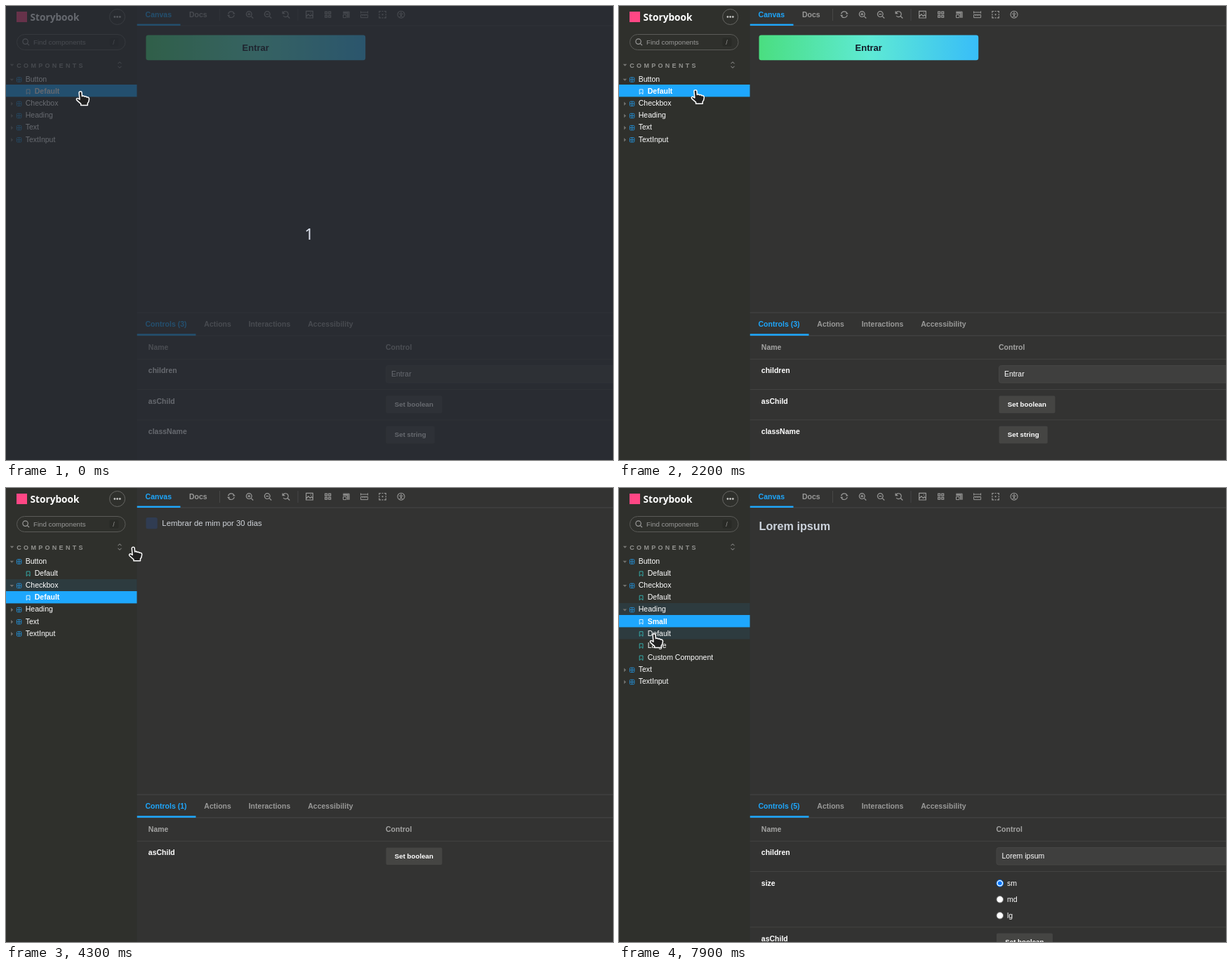
An HTML page with a canvas for the animation above (8000 ms loop, 865 by 647 pixels).

```html
<!DOCTYPE html>
<html lang="en">
<head>
<meta charset="utf-8">
<title>Component explorer</title>
<style>
html, body { margin: 0; width: 100%; height: 100%; overflow: hidden; background: #333332; }
canvas { display: block; width: 100%; height: 100%; }
</style>
</head>
<body>
<canvas id="stage" width="865" height="647"></canvas>
<script>
const W = 865, H = 647, LOOP = 8000, STEP = 100;
const ctx = document.getElementById('stage').getContext('2d');
const SANS = '"Liberation Sans", Arial, sans-serif';
const BLUE = '#1ea7fd', GREY = '#999998', LINE = '#474746', SIDE = '#2f302c', MAIN = '#333332';
const ROW_H = 17.15, FIRST_ROW = 104;

// Pointer tip: time, x, y
const PATH = [
  [0, 106, 121], [600, 106, 121], [1500, 317, 61], [1600, 317, 61],
  [2500, 36, 139], [2600, 27, 139], [2700, 27, 139], [2800, 7, 139], [2900, 7, 139],
  [3000, 8, 138], [3100, 8, 139], [3200, 8, 139], [3400, 20, 139], [3700, 34, 146],
  [3800, 34, 146], [4000, 60, 154], [4500, 247, 45], [4700, 208, 53], [5400, 208, 53],
  [5500, 207, 54], [6300, 64, 165], [6500, 42, 172], [7000, 42, 172],
  [7450, 175, 88], [7900, 50, 207], [8000, 50, 207]
];

const HAND = new Path2D('M4.6 2.7C4.5 .3 8.5 .2 8.6 2.6L8.9 7.6C10 6.9 11.6 7.2 12.2 8.1C13.4 7.6 14.8 8 15.4 8.9C17.4 8.4 19.2 9.6 19 11.8L18.2 15.6L16.8 17.6V20.4H7.2V18.4L1.5 13.4C-.2 11.4 2 9.6 4 11L5.5 12.1Z');

function pointerAt(t) {
  const i = PATH.findIndex((k, n) => n && t <= k[0]);
  const [t0, x0, y0] = PATH[i - 1], [t1, x1, y1] = PATH[i];
  const p = (t - t0) / (t1 - t0), e = p * p * (3 - 2 * p);
  return { x: x0 + (x1 - x0) * e, y: y0 + (y1 - y0) * e };
}

function rect(x, y, w, h, color) {
  ctx.fillStyle = color;
  ctx.fillRect(x, y, w, h);
}

function round(x, y, w, h, r, fill, stroke) {
  ctx.beginPath();
  ctx.roundRect(x, y, w, h, r);
  if (fill) { ctx.fillStyle = fill; ctx.fill(); }
  if (stroke) { ctx.strokeStyle = stroke; ctx.lineWidth = 1; ctx.stroke(); }
}

function circle(x, y, r, fill, stroke, width = 1) {
  ctx.beginPath();
  ctx.arc(x, y, r, 0, 7);
  if (fill) { ctx.fillStyle = fill; ctx.fill(); }
  if (stroke) { ctx.strokeStyle = stroke; ctx.lineWidth = width; ctx.stroke(); }
}

// Text centred vertically on y by its capital height
function text(s, x, y, color = '#fff', bold = false, size = 10.53, family = SANS) {
  ctx.font = `${bold ? 'bold ' : ''}${size}px ${family}`;
  ctx.fillStyle = color;
  ctx.fillText(s, x, y + size * 0.36);
}

// Strokes an SVG path around (x, y)
function icon(x, y, d, color = GREY, width = 1.2) {
  ctx.save();
  ctx.translate(x, y);
  ctx.strokeStyle = color;
  ctx.lineWidth = width;
  ctx.stroke(new Path2D(d));
  ctx.restore();
}

function triangle(x, y, open, color) {
  ctx.fillStyle = color;
  ctx.fill(new Path2D(open
    ? `M${x - 2.8} ${y - 1.2}h5.6l-2.8 3z`
    : `M${x - 1.2} ${y - 2.8}v5.6l3 -2.8z`));
}

function rowsAt(t) {
  const checkbox = t >= 3300, heading = t >= 6800;
  const active = heading ? 'Heading/Small' : checkbox ? 'Checkbox/Default' : 'Button/Default';
  const tree = [
    ['Button', ['Default']],
    ['Checkbox', checkbox ? ['Default'] : []],
    ['Heading', heading ? ['Small', 'Default', 'Large', 'Custom Component'] : []],
    ['Text', []],
    ['TextInput', []]
  ];
  const focus = heading ? 'Heading' : checkbox && t < 4700 ? 'Checkbox' : '';
  return tree.flatMap(([name, stories]) => [
    { name, open: stories.length > 0, focus: name === focus },
    ...stories.map(s => ({ name: s, story: true, active: name + '/' + s === active }))
  ]);
}

function drawRow(row, i, tip) {
  const y = FIRST_ROW + i * ROW_H, top = Math.round(y - 8.7);
  const hover = tip.x < 186 && Math.abs(tip.y - y) < ROW_H / 2;
  if (row.active) rect(0, top, 186.5, 17.4, BLUE);
  else if (hover || row.focus) rect(0, top, 186.5, 17.4, 'rgba(30,167,253,.09)');
  if (row.story) {
    icon(31.6, y + 1, 'M-2.4 -3.2H2.4V3.4L0 1.2L-2.4 3.4Z', row.active ? '#d9f1ff' : '#35aaa8', 1);
    text(row.name, 40.7, y, '#fff', row.active);
  } else {
    triangle(8.3, y + 1, row.open, hover ? '#a0a09e' : '#737370');
    icon(18.6, y + 1, 'M-3.2 -2.2Q-3.2 -3.2 -2.2 -3.2H2.2Q3.2 -3.2 3.2 -2.2V2.2Q3.2 3.2 2.2 3.2H-2.2Q-3.2 3.2 -3.2 2.2ZM0 -3.2V3.2M-3.2 0H3.2', '#2489ca', 1);
    text(row.name, 27.7, y);
  }
}

function drawSidebar(t, tip) {
  rect(0, 0, 186.5, H, SIDE);
  rect(15, 8, 15, 15, '#ff4785');
  text('Storybook', 34.5, 15.6, '#fff', true, 13.7, '"Open Sans", sans-serif');
  circle(158.6, 15.5, 11, null, '#666663');
  for (const dx of [-3.7, 0, 3.7]) circle(158.6 + dx, 15.5, 1.4, '#bdbdbb');

  round(15.5, 40.5, 154.5, 22, 11, null, '#5b5b58');
  circle(27.6, 50.6, 3.7, null, GREY, 1.2);
  icon(27.6, 50.6, 'M2.7 2.7L5.4 5.4');
  text('Find components', 39, 51.3, GREY, false, 9.72);
  round(147.5, 45.5, 13, 12, 2.5, '#292a26');
  text('/', 152.2, 51.3, GREY, false, 9);

  triangle(8.5, 84, true, '#777774');
  ctx.letterSpacing = '3.3px';
  text('COMPONENTS', 15.3, 85, '#92928f', true, 9);
  ctx.letterSpacing = '0px';
  icon(162, 84, 'M-2.5 -1.8L0 -4.3L2.5 -1.8M-2.5 1.8L0 4.3L2.5 1.8', GREY, 1);
  rowsAt(t).forEach((row, i) => drawRow(row, i, tip));
}

function drawToolbar() {
  text('Canvas', 198.6, 12, BLUE, true);
  text('Docs', 261, 12, GREY, true);
  rect(186.5, 27.5, W, 1, LINE);
  rect(186.5, 25.6, 62, 2.4, BLUE);
  rect(304, 4, 1, 17, LINE);
  rect(415.5, 4, 1, 17, LINE);

  const y = 12.2;
  icon(321, y, 'M-4.3 -.8A4.4 4.4 0 0 1 4.1 -1.5M4.3 .8A4.4 4.4 0 0 1 -4.1 1.5M2.2 -1.2H5.4M-2.2 1.2H-5.4');
  const lens = 'M3.2 -.6A3.9 3.9 0 1 1 -4.6 -.6A3.9 3.9 0 1 1 3.2 -.6M2.1 2.2L5.3 5.3';
  icon(347, y, lens + 'M-2.7 -.6H1.3M-.7 -2.6V1.4');
  icon(373, y, lens + 'M-2.7 -.6H1.3');
  icon(399, y, 'M-4.3 -2A3.9 3.9 0 1 1 -3.8 1.8M2.3 2.3L5.3 5.3M-4.8 -4.8V-1.6H-1.6');
  icon(432.5, y, 'M-4.8 -4.8H4.8V4.8H-4.8ZM-4.8 2.8L-1.6 -.4L1 2.2L2.8 .4L4.8 2.4M1.2 -2.4H2.4');
  icon(458.7, y, 'M-4 -4H-1.1V-1.1H-4ZM1.1 -4H4V-1.1H1.1ZM-4 1.1H-1.1V4H-4ZM1.1 1.1H4V4H1.1Z');
  icon(484.7, y, 'M-4.2 .3H.2V4.4H-4.2ZM-4.4 -1.6H2V4.6M-4.4 -4H4.4V4.6M-4.4 -2.8H3.2V4.6', GREY, 1);
  icon(510.6, y, 'M-5 .2H5V4.4H-5ZM-5 -3.2H5M-5 -4.8V-1.6M5 -4.8V-1.6M-2.4 .2V2M0 .2V2M2.4 .2V2', GREY, 1);
  icon(536.6, y, 'M-4.7 -2.4V-4.7H-2.4M2.4 -4.7H4.7V-2.4M4.7 2.4V4.7H2.4M-2.4 4.7H-4.7V2.4M-1 -4.7H1M-1 4.7H1M-4.7 -1V1M4.7 -1V1M-1 0H1M0 -1V1');
  circle(563, y, 5, null, GREY, 1.1);
  circle(563, y - 2.7, 0.9, GREY);
  icon(563, y, 'M-3 -.9H3M0 -.9V.8M-1.5 3.6L0 .6L1.5 3.6', GREY, 1.1);
}

function drawCanvas(t, tip) {
  if (t < 3300) {
    const g = ctx.createLinearGradient(199.5, 0, 512, 0);
    g.addColorStop(0, '#4ade80');
    g.addColorStop(0.5, '#5eead4');
    g.addColorStop(1, '#38bdf8');
    round(199.5, 41.5, 312.7, 35.7, 3.2, g);
    if (tip.x > 199 && tip.x < 512 && tip.y > 41 && tip.y < 77) {
      ctx.strokeStyle = '#4ade80';
      ctx.lineWidth = 3;
      ctx.beginPath();
      ctx.roundRect(201, 43, 309.7, 32.7, 2);
      ctx.stroke();
    }
    text('Entrar', 336.6, 59.2, '#111827', true, 13);
  } else if (t >= 3400 && t < 6800) {
    round(199.5, 42, 16.3, 16.3, 2.5, '#303c52');
    text('Lembrar de mim por 30 dias', 222.3, 49.8, '#d1d5db', false, 11.4);
  } else if (t >= 6900) {
    text('Lorem ipsum', 199.5, 54, '#ccd3dc', true, 16.2);
  }
}

function setButton(label, x, y, w) {
  round(x, y - 12.2, w, 24.6, 2, '#454543');
  text(label, x + 12.3, y, '#fff', true, 9.72);
}

function field(value, x) {
  round(x, 512.5, W, 24.5, 3, '#3f3f3e', '#464645');
  text(value, x + 7.5, 524.6);
}

function radio(label, y, on) {
  circle(542.8, y + 0.3, 4.8, '#fff', on ? '#0075ff' : '#767676');
  if (on) circle(542.8, y + 0.3, 3, '#0075ff');
  text(label, 553, y);
}

function drawPanel(t) {
  const heading = t >= 6800, button = t < 3300;
  const count = heading ? 5 : button ? 3 : 1, x = heading ? 538 : 541.5;
  const name = (s, y) => text(s, 202.8, y, '#fff', true);
  const line = y => rect(186.5, y, W, 1, '#424241');

  rect(186.5, 436.5, W, 1, LINE);
  text(`Controls (${count})`, 198.5, 453.6, BLUE, true);
  text('Actions', 282.3, 453.6, GREY, true);
  text('Interactions', 345.7, 453.6, GREY, true);
  text('Accessibility', 430.2, 453.6, GREY, true);
  rect(186.5, 469.3, W, 1, LINE);
  rect(186.5, 467.2, 84, 2.6, BLUE);
  text('Name', 202.8, 486.2, '#a3a3a2', true);
  text('Control', x - 0.5, 486.2, '#a3a3a2', true);
  line(502.8);

  if (heading) {
    name('children', 519.6);
    field('Lorem ipsum', x);
    line(546);
    name('size', 562.8);
    radio('sm', 563, true);
    radio('md', 586, false);
    radio('lg', 609, false);
    line(625.3);
    name('asChild', 641.8);
    setButton('Set boolean', x, 646.8, 80);
  } else if (button) {
    name('children', 519.6);
    field('Entrar', x);
    line(546);
    name('asChild', 562.8);
    setButton('Set boolean', x, 567.8, 80);
    line(589.3);
    name('className', 606);
    setButton('Set string', x, 611, 69.3);
  } else {
    name('asChild', 519.6);
    setButton('Set boolean', x, 524.7, 80);
  }
}

function drawHand(tip) {
  ctx.save();
  ctx.translate(tip.x - 6.5, tip.y);
  ctx.lineJoin = 'round';
  ctx.fillStyle = '#202020';
  ctx.fill(HAND);
  ctx.strokeStyle = '#fff';
  ctx.lineWidth = 1.5;
  ctx.stroke(HAND);
  ctx.restore();
}

function draw(t) {
  const tip = pointerAt(t);
  rect(0, 0, W, H, MAIN);
  drawToolbar();
  drawCanvas(t, tip);
  drawPanel(t);
  drawSidebar(t, tip);
  if (t < 100) {
    rect(0, 0, W, H, 'rgba(38,42,50,.7)');
    text('1', 425.4, 324.4, '#dde3ee', false, 22.5, '"Noto Sans", sans-serif');
  }
  drawHand(tip);
}

const start = performance.now();
function tick() {
  const t = (performance.now() - start) % LOOP;
  draw(Math.floor(t / STEP) * STEP);
  requestAnimationFrame(tick);
}
tick();
</script>
</body>
</html>
```
